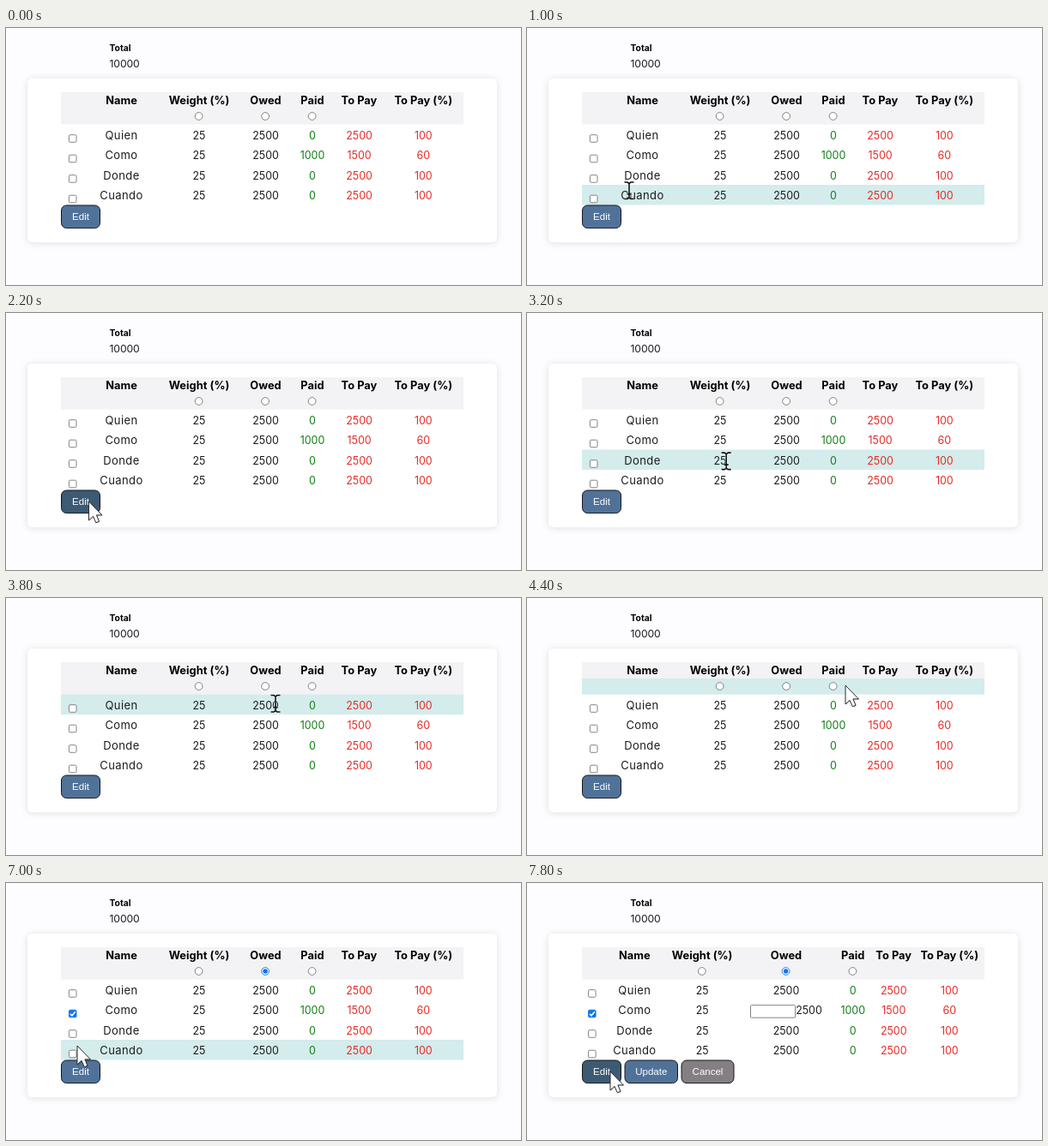
Animation of 600 by 300 pixels, one loop 8 s. Source, as an HTML page:

```html
<!DOCTYPE html>
<html lang="en">
<head>
<meta charset="utf-8">
<title>Shared costs</title>
<style>
html, body { margin: 0; width: 100%; height: 100%; overflow: hidden; background: #fdfcfe; }
svg { display: block; width: 600px; height: 300px; }
text { font: 400 12.4px Inter, "Open Sans", sans-serif; fill: #1b1b1f; }
.mid { text-anchor: middle; }
.head { font-size: 12.8px; font-weight: 700; letter-spacing: .05px; fill: #000; }
.name { font-size: 13px; letter-spacing: .4px; }
.total { font-size: 10.3px; font-weight: 700; fill: #000; }
.sum { font-size: 12.2px; letter-spacing: -.1px; }
.paid { fill: #0f7d14; }
.due { fill: #e62a26; }
.btn { font: 11.5px "Liberation Sans", Arial, sans-serif; fill: #fff; }
</style>
</head>
<body>
<svg id="stage" viewBox="0 0 600 300"></svg>
<script>
const stage = document.getElementById('stage');
const LOOP = 8000, TICK = 200;
const LEFT = 64, WIDTH = 469, ROW = 23.5, HEAD = 75, SUBHEAD = 94, BODY = 112.5;
const RADIO_ON = 6000, CHECK_ON = 6600, EDIT_ON = 7800;
const BLUE = '#507299', TOTAL = 10000, WEIGHT = 25;

const heads = ['Name', 'Weight (%)', 'Owed', 'Paid', 'To Pay', 'To Pay (%)'];
const kinds = ['name', '', '', 'paid', 'due', 'due'];
const rows = [['Quien', 0], ['Como', 1000], ['Donde', 0], ['Cuando', 0]].map(([name, paid]) => {
  const owed = TOTAL * WEIGHT / 100, due = owed - paid;
  return [name, WEIGHT, owed, paid, due, due / owed * 100];
});

// Column widths; an input widens "Owed" and the others shrink in proportion
const widths = [29.4, 82.2, 98.8, 56.2, 52.8, 56.2, 93.4];
const OWED = 3, OWED_EDIT = 109.6;

function columns(editing) {
  const shrink = (WIDTH - OWED_EDIT) / (WIDTH - widths[OWED]);
  let edge = LEFT;
  return widths.map((w, i) => {
    const size = !editing ? w : i === OWED ? OWED_EDIT : w * shrink;
    edge += size;
    return edge - size / 2;
  });
}

// Pointer stops: arrival time, x, y, number of ticks the move takes
const stops = [
  [200, 330, 254, 1], [600, 140, 21, 2], [1000, 119, 189.5, 2], [1200, 123, 149, 1],
  [1400, 283, 150, 1], [1800, 170, 22, 1], [2200, 96.5, 220, 2], [3400, 300, 149, 3],
  [3800, 314, 123, 1], [4000, 345, 21, 1], [4400, 371, 102, 2], [4800, 353, 100, 1],
  [5600, 300.5, 102, 2], [6600, 78, 151, 3], [7000, 83, 190, 1], [7400, 97, 220, 2]
];

function pointerAt(t) {
  const now = Math.floor(t / TICK) * TICK;
  let [x, y] = [-99, -99];
  for (const [end, ex, ey, ticks] of stops) {
    const k = Math.min(1, 1 - (end - now) / (ticks * TICK));
    if (k <= 0) break;
    x += (ex - x) * k;
    y += (ey - y) * k;
  }
  return [x, y];
}

const rect = (x, y, w, h, fill, more = '') =>
  `<rect x="${x}" y="${y}" width="${w}" height="${h}" fill="${fill}" ${more}/>`;
const label = (x, y, str, cls) => `<text x="${x}" y="${y}" class="${cls}">${str}</text>`;

function radio(x, on, hover) {
  const tint = on ? (hover ? '#0b4fa8' : '#0b76f0') : (hover ? '#4f4f4f' : '#767676');
  return `<circle cx="${x}" cy="103" r="4.4" fill="#fff" stroke="${tint}" stroke-width=".9"/>` +
    (on ? `<circle cx="${x}" cy="103" r="2.8" fill="${tint}"/>` : '');
}

function checkbox(x, y, on) {
  const tint = on ? '#0b76f0' : '#767676';
  return rect(x - 4.3, y - 4.3, 8.6, 8.6, on ? tint : '#fff', `rx="1.5" stroke="${tint}" stroke-width=".9"`) +
    (on ? `<path d="M${x - 2.8} ${y + .2}l2 2.1 3.8-4.6" fill="none" stroke="#fff" stroke-width="1.5"/>` : '');
}

function button(x, w, str, fill, pressed) {
  const edge = pressed ? '#3a3a3a' : '#14161a';
  return rect(x + .5, 207, w - 1, 26.6, fill, `rx="6" stroke="${edge}"`) +
    label(x + w / 2, 224, str, 'btn mid');
}

function pointer(x, y, beam) {
  const d = beam
    ? 'M-5.5-9.5h3.5l2 1.5 2-1.5h3.5M0-8V8.5M-5.5 10h3.5l2-1.5 2 1.5h3.5M-2.5 4.5h5'
    : 'M0 0V22L5 17.3 8.3 24.8 12 23.2 8.9 15.9H15.4Z';
  const under = beam
    ? 'fill="none" stroke="#fff" stroke-opacity=".6" stroke-width="3"'
    : 'transform="translate(1 1)" opacity=".18"';
  const over = beam
    ? 'fill="none" stroke="#111" stroke-width="1.6"'
    : 'fill="#fff" stroke="#2a2a2e" stroke-linejoin="round"';
  return `<g transform="translate(${x} ${y})"><path d="${d}" ${under}/><path d="${d}" ${over}/></g>`;
}

const backdrop =
  '<defs><filter id="soft" x="-5%" y="-12%" width="110%" height="126%">' +
  '<feDropShadow dx="0" dy="1" stdDeviation="4" flood-color="#25253a" flood-opacity=".12"/></filter></defs>' +
  rect(0, 0, 600, 300, '#fdfcfe') +
  label(120.5, 27, 'Total', 'total') + label(120.5, 45.7, TOTAL, 'sum') +
  rect(25, 59, 547, 191, '#fff', 'rx="6" filter="url(#soft)"') +
  rect(LEFT, HEAD, WIDTH, BODY - HEAD, '#f3f2f4');

function draw(t) {
  const [px, py] = pointerAt(t);
  const editing = t >= EDIT_ON;
  const [first, ...cols] = columns(editing);
  const inside = (x, y, w, h) => px >= x && px < x + w && py >= y && py < y + h;
  const band = (y, h) => inside(LEFT, y, WIDTH, h) ? rect(LEFT, y, WIDTH, h, '#d4ecec') : '';

  let out = backdrop + band(HEAD, SUBHEAD - HEAD) + band(SUBHEAD, BODY - SUBHEAD);
  heads.forEach((str, i) => out += label(cols[i], 89, str, 'head mid'));
  for (const i of [1, 2, 3]) {
    const x = cols[i] - .4;
    out += radio(x, i === 2 && t >= RADIO_ON, Math.hypot(px - x, py - 103) < 5.5);
  }

  rows.forEach((row, r) => {
    const y = BODY + r * ROW;
    out += band(y, ROW) + checkbox(first - 1, y + 16.5, r === 1 && t >= CHECK_ON);
    row.forEach((value, i) => {
      const field = editing && r === 1 && i === 2;
      if (field) out += rect(260.5, y + 30.1 - ROW, 52, 14.6, '#fff', 'rx="1" stroke="#767676" stroke-width=".9"');
      out += label(cols[i] + (field ? 26.5 : 0), y + 17.1, value, kinds[i] + ' mid');
    });
  });

  const onEdit = inside(64, 207, 46, 27);
  out += button(64, 46, 'Edit', onEdit ? '#3c5a73' : BLUE, t >= 2600 && t < 3000);
  if (editing) out += button(113.5, 62.5, 'Update', BLUE) + button(179.5, 62, 'Cancel', '#837f83');

  const overText = inside(LEFT, BODY, WIDTH, 4 * ROW) && cols.some(x => Math.abs(px - x) < 16);
  return out + pointer(px, py, overText);
}

let shown = '';
function tick(now) {
  const next = draw(now % LOOP);
  if (next !== shown) stage.innerHTML = shown = next;
  requestAnimationFrame(tick);
}
requestAnimationFrame(tick);
</script>
</body>
</html>
```
